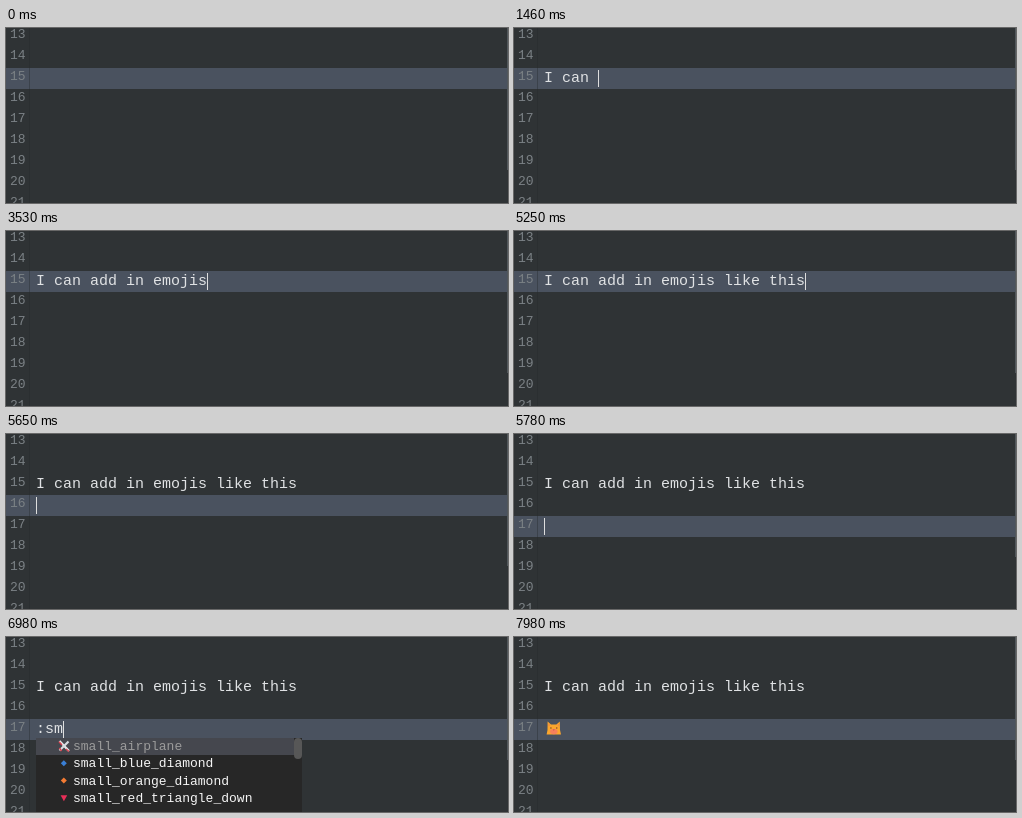
These frames come from a looping animation (502x175 px, 8 s). An HTML page:

```html
<!DOCTYPE html>
<html lang="en">
<head>
<meta charset="utf-8">
<title>Emoji completion</title>
<style>
  html, body { margin: 0; width: 100%; height: 100%; overflow: hidden; background: #2f3335; }
  svg { display: block; width: 502px; height: 175px; }
  text { font: 15px "Liberation Mono", "Courier New", monospace; fill: #e0e2e4; white-space: pre; }
  .num { font-size: 13px; fill: #7b8185; }
  .item { font-size: 13px; fill: #f6f6f6; }
  .item.on { fill: #9b9b9b; }
</style>
</head>
<body>
<svg viewBox="0 0 502 175">
  <defs>
    <g id="cat">
      <path d="M1.6 0.4 L5 3.4 H10.4 L13.8 0.4 L14 9 L15 13.6 H0.6 L1.5 9Z" fill="#fba62d"/>
      <path d="M2.4 2.4 L4.2 4 L2.5 5.4ZM13 2.4 L11.2 4 L12.9 5.4Z" fill="#ee8a48"/>
      <ellipse cx="7.8" cy="10.6" rx="3.8" ry="2.6" fill="#f5805c"/>
      <path d="M4.2 6.2H5.6V7.8H4.2ZM10 6.2H11.4V7.8H10Z" fill="#9a5a30"/>
      <path d="M6.8 8.6H8.8L7.8 9.8Z" fill="#c64a52"/>
    </g>
    <g id="plane">
      <path d="M1.5 1 L11 11" stroke="#e6e8ea" stroke-width="2.2"/>
      <path d="M10.5 1.5 L1.5 10.5" stroke="#d6dbe0" stroke-width="2.2"/>
      <path d="M1 1.8 L4 5M8 9 L11 11.5M1.5 8 L3.5 11" stroke="#d9404e" stroke-width="1.4"/>
    </g>
    <path id="diamond" d="M5.8 2.9 L8.8 5.9 L5.8 8.9 L2.8 5.9Z"/>
    <path id="down" d="M2.6 3.2 H9.2 L5.9 9.2Z"/>
    <rect id="square" x="1" y="1" width="10" height="10" rx="2"/>
    <path id="thumb" d="M1 6 H4 L6 1 H7.5 V5 H11 V11 H1Z"/>
    <path id="sail" d="M6 0 V8 H1ZM7 2 L11 8 H7ZM0 9 H12 L10 12 H2Z"/>
    <g id="smile">
      <circle cx="6" cy="6" r="5.6" fill="#fdcb58"/>
      <path d="M3 7 Q6 11 9 7ZM3.6 3.5H4.8V5.5H3.6ZM7.2 3.5H8.4V5.5H7.2Z" fill="#664500"/>
    </g>
    <use id="kitten" href="#cat" transform="scale(.77)"/>
  </defs>
  <rect width="502" height="175" fill="#2f3335"/>
  <rect id="band" width="502" height="21" fill="#4a525f"/>
  <rect x="23" width="1" height="175" fill="#272b2e" opacity=".4"/>
  <g id="nums"></g>
  <rect id="bar" x="501" width="1" fill="#51575b"/>
  <text id="line1" x="30" y="54"></text>
  <text id="line2" x="30" y="96"></text>
  <use id="face" href="#cat" x="32" y="84"/>
  <g id="popup">
    <rect id="panel" x="30" y="101" height="74" fill="#272727"/>
    <rect id="pick" x="30" y="101" height="17" fill="#45474e"/>
    <rect id="grip" y="101" width="8" height="21" rx="4" fill="#575757"/>
    <g id="items"></g>
  </g>
  <rect id="caret" width="1" height="17" fill="#dedede"/>
</svg>
<script>
const $ = id => document.getElementById(id);
const LOOP = 8000;
const PHRASE = "I can add in emojis like this";

// Moment each letter of the phrase appears
const keys = [
  800, 1000, 1130, 1260, 1330, 1460, 1730,
  1930, 2000, 2130, 2260, 2330, 2460,
  2930, 3000, 3130, 3330, 3400, 3530, 3800, 4330, 4390,
  4590, 4720, 4790, 4920, 5050, 5120, 5250
];

// Start and end of each spell without a caret
const hidden = [[0, 140], [670, 800], [6310, 6380], [7980, 8000]];

// Second typed line: [time, text]
const query = [[0, ""], [6380, ":"], [6780, ":s"], [6980, ":sm"], [7240, ":smi"], [7440, ":smile"], [7780, ""]];

// Suggestions: time, width, rows of [name, icon, colour]
const lists = [
  [6450, 250, [["+1", "thumb", "#fdcb58"], ["-1", "thumb", "#fdcb58"],
    ["100", "square", "#d9303e"], ["1234", "square", "#3b88c3"]]],
  [6780, 250, [["sa", "square", "#e8663c"], ["sagittarius", "square", "#9266cc"],
    ["sailboat", "sail", "#dbe4ea"], ["sake", "square", "#4b87b5"]]],
  [6980, 266, [["small_airplane", "plane"], ["small_blue_diamond", "diamond", "#3a7fd5"],
    ["small_orange_diamond", "diamond", "#f47b33"], ["small_red_triangle_down", "down", "#e92f58"]]],
  [7240, 250, [["smile", "smile"], ["smile_cat", "kitten"],
    ["smiley", "smile"], ["smiley_cat", "kitten"]]]
];

const set = (el, attrs) => { for (const k in attrs) el.setAttribute(k, attrs[k]); };
const show = (el, on) => set(el, { visibility: on ? "visible" : "hidden" });
const latest = (rows, t) => rows.filter(r => r[0] <= t).pop();

for (let i = 0; i < 9; i++)
  $("nums").innerHTML += `<text class="num" x="4" y="${10 + i * 21}">${13 + i}</text>`;

let shown;
function fill(list) {
  if (list === shown) return;
  shown = list;
  show($("popup"), list);
  if (!list) { $("items").innerHTML = ""; return; }
  const [, width, rows] = list;
  set($("panel"), { width });
  set($("pick"), { width: width - 8 });
  set($("grip"), { x: 22 + width });
  $("items").innerHTML = rows.map(([name, icon, color], i) => {
    const y = 113 + i * 17.33;
    return `<use href="#${icon}" x="52" y="${y - 10}" fill="${color || "none"}"/>` +
      `<text class="item${i ? "" : " on"}" x="67" y="${y}">${name}</text>`;
  }).join("");
}

function draw(t) {
  const count = keys.filter(k => k <= t).length;
  const typed = latest(query, t)[1];
  const row = t < 5650 ? 0 : t < 5780 ? 1 : 2;
  const done = t >= 7780;
  const column = row === 0 ? count : typed.length;

  $("line1").textContent = PHRASE.slice(0, count);
  $("line2").textContent = typed;
  set($("band"), { y: 40 + row * 21 });
  set($("bar"), { height: [142, 132, 123][row] });
  set($("caret"), {
    x: done ? 49 : 30 + column * 9,
    y: done ? 82 : 42 + row * 21,
    height: done ? 21 : 17
  });
  show($("caret"), !hidden.some(([a, b]) => t >= a && t < b));
  show($("face"), done);
  fill(done ? null : latest(lists, t) || null);
}

const start = performance.now();
function tick() {
  draw((performance.now() - start) % LOOP);
  requestAnimationFrame(tick);
}
tick();
</script>
</body>
</html>
```
